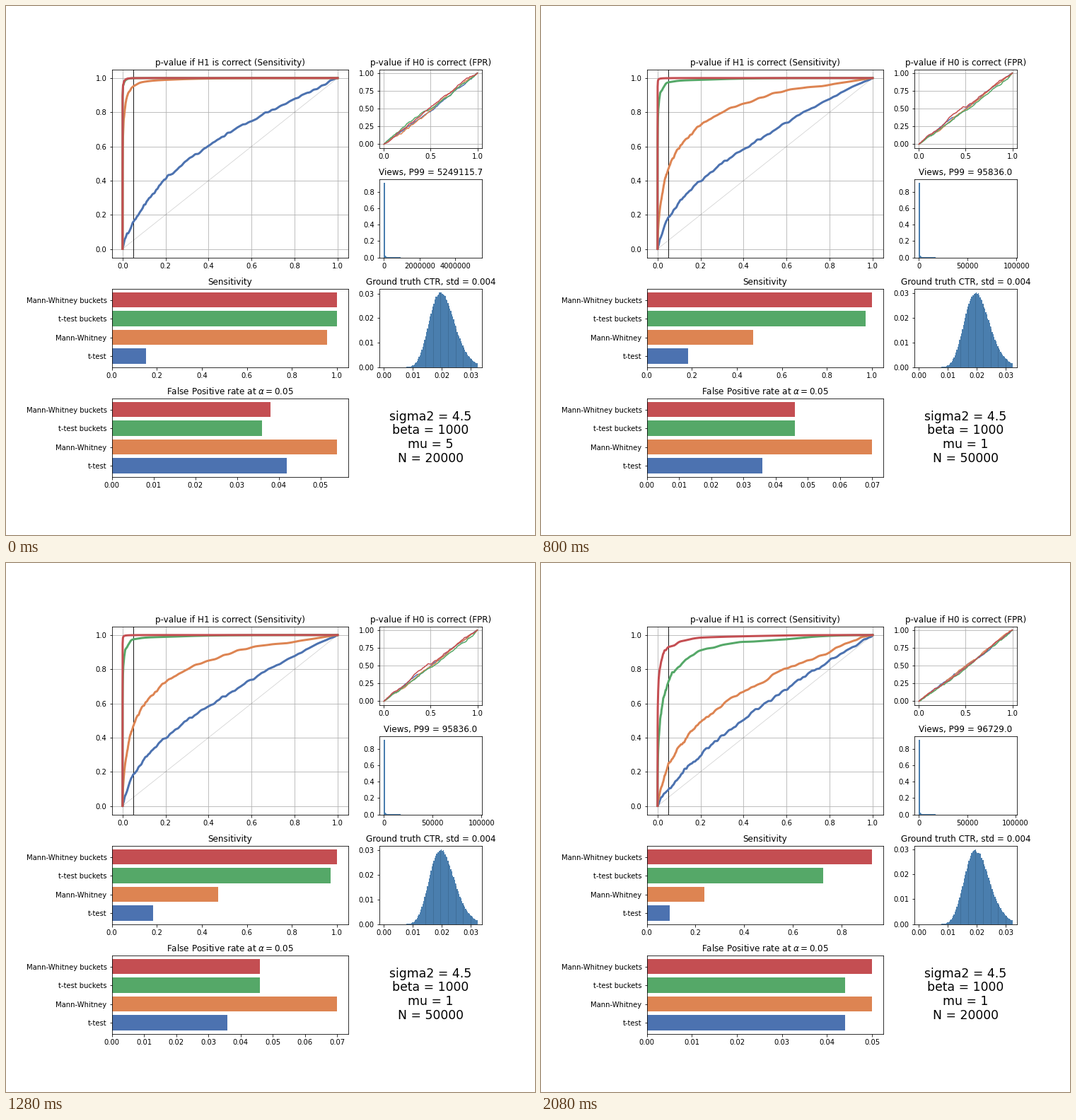
A matplotlib script that plays this animation: 748 px wide and 748 px high, repeating every 2.4 s.

```python
import math

import matplotlib.pyplot as plt
import numpy as np
from matplotlib.animation import FuncAnimation

plt.rcParams["font.family"] = "DejaVu Sans"

COLORS = ["#4c72b0", "#dd8452", "#55a868", "#c44e52"]
HIST, HIST_EDGE = "#4a7eae", "#38648c"
TESTS = ["t-test", "Mann-Whitney", "t-test buckets", "Mann-Whitney buckets"]
RUNS = 500  # simulated experiments behind every curve

phi = np.vectorize(lambda z: 0.5 * (1 + math.erf(z / math.sqrt(2))))
Z = np.linspace(-8, 8, 2401)
CDF = phi(Z)


def probit(p):
    return np.interp(p, CDF, Z)


def sampling_noise(u, seed, first=1):
    """Brownian bridge of an empirical CDF, as a sine series from term `first`."""
    k = np.arange(first, 120)
    weights = np.random.default_rng(seed).normal(size=k.size) / (k * np.pi)
    return np.sin(np.pi * np.outer(u, k)) @ weights * math.sqrt(2 / RUNS)


def power_curve(power, heights, seed):
    """Share of p-values below x: straight pieces in probit space.

    Passes through `power` at 0.05 and `heights` at 0.01, 0.2, 0.5, 0.8.
    """
    levels = np.array([0.01, 0.05, 0.2, 0.5, 0.8])[:len(heights) + 1]
    t = probit(levels)
    z = probit(np.array([heights[0], min(power, 0.9995), *heights[1:]]))
    t = np.r_[-8, t, 8]
    slope = 0.9
    z = np.r_[z[0] + slope * (t[0] - t[1]), z, z[-1] + slope * (t[-1] - t[-2])]
    y = phi(np.interp(Z, t, z))
    y = np.maximum.accumulate(y + sampling_noise(y, seed, first=10))
    return np.r_[0, CDF, 1], np.clip(np.r_[0, y, 1], 0, 1)


SCENES = [
    dict(mu=5, n=20000, p99=5249115.7, ctr_peak=0.0305,
         power=[0.152, 0.954, 1.0, 1.0], fpr=[0.042, 0.054, 0.036, 0.038],
         heights=[(0.05, 0.41, 0.683, 0.875), (0.81, 0.99), (0.985,), (0.985,)]),
    dict(mu=1, n=50000, p99=95836.0, ctr_peak=0.0301,
         power=[0.182, 0.472, 0.972, 1.0], fpr=[0.036, 0.070, 0.046, 0.046],
         heights=[(0.05, 0.40, 0.66, 0.88), (0.22, 0.723, 0.893, 0.965),
                  (0.89, 0.99), (0.997,)]),
    dict(mu=1, n=20000, p99=96729.0, ctr_peak=0.03,
         power=[0.094, 0.236, 0.724, 0.926], fpr=[0.044, 0.050, 0.044, 0.050],
         heights=[(0.03, 0.30, 0.598, 0.85), (0.07, 0.49, 0.738, 0.905),
                  (0.47, 0.905, 0.973, 0.995), (0.80, 0.987, 0.997)]),
]

fig = plt.figure(figsize=(748 / 72, 748 / 72), dpi=72, facecolor="white")
grid = fig.add_gridspec(4, 3, left=0.2, right=0.9, bottom=0.11, top=0.88,
                        wspace=0.3, hspace=0.4)
ax_h1 = fig.add_subplot(grid[:2, :2])
ax_power = fig.add_subplot(grid[2, :2])
ax_fpr = fig.add_subplot(grid[3, :2])
ax_h0, ax_views, ax_ctr, ax_note = [fig.add_subplot(grid[r, 2]) for r in range(4)]


def draw_h1(powers, heights, seed):
    ax_h1.set_title("p-value if H1 is correct (Sensitivity)")
    ax_h1.grid(True)
    ax_h1.plot([0, 1], [0, 1], color="black", alpha=0.2, lw=0.7)
    ax_h1.axvline(0.05, color="black", lw=0.9)
    for k, color in enumerate(COLORS):
        x, y = power_curve(powers[k], heights[k], seed + k)
        ax_h1.plot(x, y, color=color, lw=3)


def draw_h0(seed):
    ax_h0.set_title("p-value if H0 is correct (FPR)")
    ax_h0.grid(True)
    x = np.linspace(0, 1, 250)
    for k, color in enumerate(COLORS):
        ax_h0.plot(x, x + sampling_noise(x, seed + k), color=color, lw=1.5)


def draw_bars(ax, title, values):
    ax.set_title(title)
    ax.barh(TESTS, values, color=COLORS)


def draw_hist(ax, title, heights, x_max):
    ax.set_title(title)
    edges = np.linspace(0, x_max, heights.size + 1)
    ax.bar(edges[:-1], heights, edges[1], align="edge", color=HIST, lw=0)


def draw_views(p99):
    # log-normal with sigma 4.5, cut at its 99th percentile
    share = np.arange(1, 101) / 100
    cdf = np.r_[0, phi(2.326 + np.log(share) / 4.5)] / 0.99
    draw_hist(ax_views, f"Views, P99 = {p99}", np.diff(cdf), p99)
    ax_views.ticklabel_format(axis="x", style="plain")


def draw_ctr(peak, seed):
    x_max = 0.0323
    x = (np.arange(100) + 0.5) / 100 * x_max
    # beta distribution around 0.02
    log_pdf = 20 * np.log(x) + 1000 * np.log(1 - x)
    heights = np.exp(log_pdf - log_pdf.max())
    heights *= 1 + 0.01 * np.random.default_rng(seed).normal(size=x.size)
    heights *= peak / heights.max()
    draw_hist(ax_ctr, "Ground truth CTR, std = 0.004", heights, x_max)
    ax_ctr.vlines(x[44::8], 0, heights[44::8], color=HIST_EDGE, lw=0.6)


def draw(i):
    scene = SCENES[i]
    for ax in fig.axes:
        ax.clear()
    draw_h1(scene["power"], scene["heights"], 10 * i)
    draw_h0(100 + 10 * i)
    draw_bars(ax_power, "Sensitivity", scene["power"])
    draw_bars(ax_fpr, r"False Positive rate at $\alpha=0.05$", scene["fpr"])
    draw_views(scene["p99"])
    draw_ctr(scene["ctr_peak"], 60 + i)
    note = f"sigma2 = 4.5\nbeta = 1000\nmu = {scene['mu']}\nN = {scene['n']}"
    ax_note.text(0.5, 0.5, note, ha="center", va="center",
                 fontsize="xx-large", linespacing=1.12)
    ax_note.axis("off")
    return fig.axes


anim = FuncAnimation(fig, draw, frames=len(SCENES), interval=800,
                     repeat=True, repeat_delay=0, blit=False)
plt.show()
```
